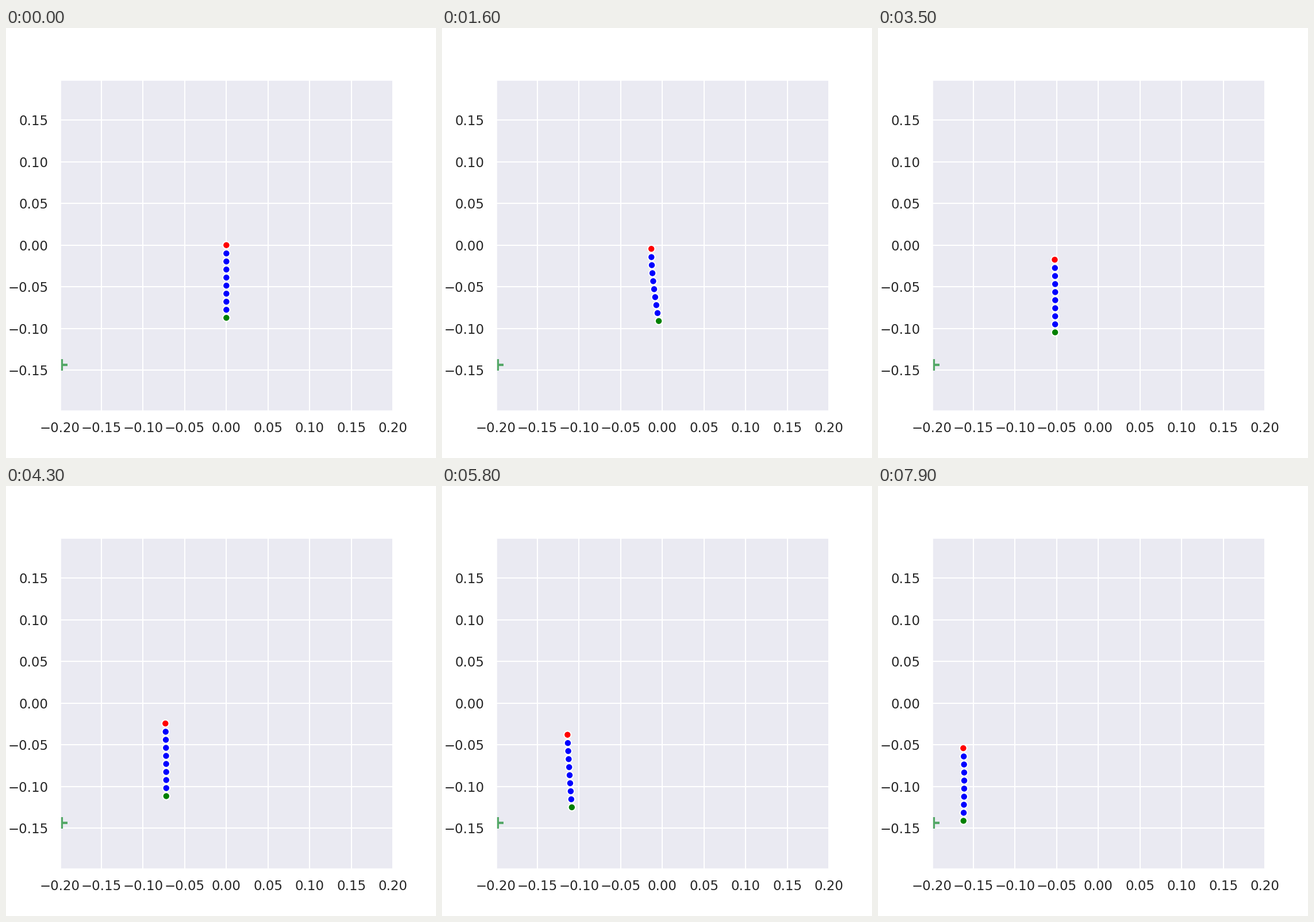
Animation of 748x748 px, one loop 8000 ms. Source, as a matplotlib script:

```python
import numpy as np
import matplotlib.pyplot as plt
from matplotlib.animation import FuncAnimation

SIZE, INCHES = 748, 5
FRAMES, STEP = 80, 100
LINKS = 9
LINK = np.full(LINKS, 14.0)   # link lengths in pixels
LINK[0] = 14.4
SCALE = 0.775 * SIZE / 0.4    # pixels per data unit

plt.rcParams.update({
    "font.family": "DejaVu Sans",
    "font.size": 11,
    "axes.facecolor": "#EAEAF2",
    "axes.edgecolor": "white",
    "axes.linewidth": 1.25,
    "grid.color": "white",
    "grid.linewidth": 1,
})


def chain(t):
    """Joint positions in data units, head first."""
    # The head speeds up from rest and slowly eases off on a straight path.
    travel = t * t * (0.0803 - 0.00054 * t + 0.014 * np.exp(-t / 11))
    # The tail lags in a damped swing while the middle bows.
    lag = 17.3 * np.exp(-t / 70) * (1 - np.cos(2 * np.pi * t / 38)) / 2
    bow = 0.02 * t - 0.22 * lag
    u = np.arange(LINKS + 1) / LINKS
    off = lag * u + bow * np.sin(np.pi * u ** 0.8)
    drop = np.sqrt(LINK ** 2 - np.diff(off) ** 2)
    x = off - travel
    y = -travel / 3 - np.concatenate([[0], np.cumsum(drop)])
    return np.column_stack([x, y]) / SCALE


fig = plt.figure(figsize=(INCHES, INCHES), dpi=SIZE / INCHES,
                 facecolor="white")
ax = fig.add_axes([0.125, 0.11, 0.775, 0.77])
half = 0.2 * 0.77 / 0.775
ax.set_xlim(-0.2, 0.2)
ax.set_ylim(-half, half)
ax.set_xticks(np.arange(-4, 5) * 0.05)
ax.set_yticks(np.arange(-3, 4) * 0.05)
ax.xaxis.set_major_formatter("{x:.2f}")
ax.yaxis.set_major_formatter("{x:.2f}")
ax.tick_params(length=0, pad=9.5, labelcolor="0.15")
ax.set_axisbelow(True)
ax.grid(True)

ax.plot([-0.1974], [-0.144], "+", color="#55A868", ms=10, mew=2)
dots = ax.scatter(*chain(0).T, s=36, edgecolors="white", linewidths=1,
                  zorder=2.2,
                  c=["red"] + ["blue"] * (LINKS - 1) + ["green"])


def update(t):
    dots.set_offsets(chain(t))
    return dots,


anim = FuncAnimation(fig, update, frames=FRAMES, interval=STEP,
                     repeat=True, repeat_delay=0)
plt.show()
```
